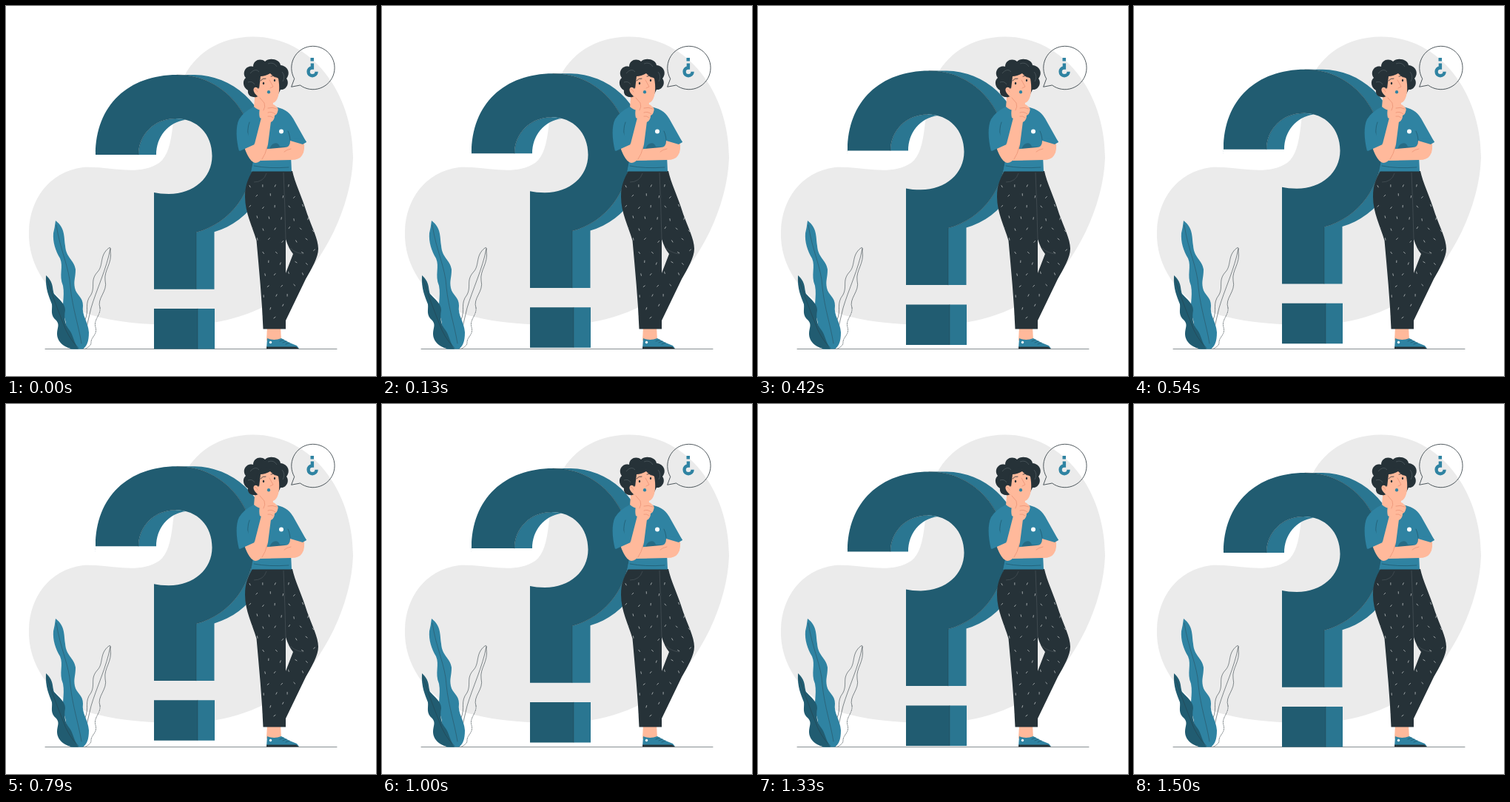
Recreate the animation shown at these times as an HTML page. Size 500 by 500 pixels, loop 1.54 s.

```html
<!DOCTYPE html>
<html lang="en">
<head>
<meta charset="utf-8">
<title>Thinking</title>
<style>
  html, body { margin: 0; width: 100%; height: 100%; overflow: hidden; background: #fff; }
  svg { display: block; width: 100%; height: 100%; }
  .blue { fill: #2f83a2; }
  .side { fill: #2a7691; }
  .deep { fill: #215c71; }
  .dark { fill: #263238; }
  .skin { fill: #ffb99b; }
  .line { fill: none; stroke: #263238; stroke-width: .8; stroke-linecap: round; stroke-linejoin: round; }
  .thin { stroke-width: .55; }
  .fold { fill: none; stroke: #215c71; stroke-width: .8; stroke-linecap: round; }
  .crease { fill: none; stroke: #e88f72; stroke-width: .7; stroke-linecap: round; }
</style>
</head>
<body>
<svg viewBox="0 0 500 500">
  <path fill="#ebebeb" d="M31 304C32 262 58 224 104 218C140 216 178 231 207 212C231 194 221 139 238 101C254 64 289 42 333 41.500C412 41 469 116 469 205C467 270 430 346 383 386C344 414 294 431 240 431C190 431 139 428 100 412C60 393 29 352 31 304Z"/>
  <path class="line thin" d="M53 463.500H447"/>

  <g id="plant">
    <path class="line thin" d="M107 424C113 410 105 403 115 390C121 378 113 371 124 359C132 350 126 337 139 327Q142 325 141 331C144 348 132 357 134 371C138 386 122 395 127 408M141 328C136 355 122 384 115 408Q107 436 105 462"/>
    <path class="line thin" stroke-dasharray="1.500 1.200" d="M127 408C128 418 118 424 121 434C124 445 114 447 115 456Q113 461 107 463"/>
    <path class="blue" d="M67 290C80 300 78 311 80 324C81 340 92 343 94 356C94 368 91 371 93 381C95 391 104 393 104 405C102 418 111 426 112 441C112 454 109 460 104 463.500H87C79 447 84 435 79 421C74 406 80 394 77 378C71 364 78 352 73 341C67 331 63 319 64 307Q66 299 67 290Z"/>
    <path class="deep" d="M54 364C65 374 62 381 65 389C72 397 80 402 80 411C78 422 80 431 85 437C91 444 91 454 98 463.500H91C78 462 69 453 69 443C69 435 73 431 68 425C59 418 63 410 62 403C58 392 53 383 54 364Z"/>
    <path class="line thin" d="M68 296C73 330 86 354 87 380C90 409 98 431 102 456M55 368Q66 401 77 428Q84 449 98 462" opacity=".65"/>
  </g>

  <g id="mark">
    <path class="side" d="M231 93.400H255A104 108 0 0 1 281.500 305.500V383H257V306C304 294 335 250 335 201C335 142 290 93.400 231 93.400Z"/>
    <path class="deep" d="M121 201.400C121 134 166 93.400 231 93.400C290 93.400 335 142 335 201C335 250 304 294 257 306V383H200V252.400Q208 254.300 220 254.300C254 254.300 278.500 232 278.500 203C278.500 174 259 152.400 229 152.400C201 152.400 179 174 179 201.400Z"/>
    <path class="side" d="M179 201.400C179 174 201 152.400 229 152.400Q237 152.400 243 154C219 157 203 177 203 201.400Z"/>
    <path class="deep" d="M200 409.400H259V463.900H200Z"/>
    <path class="side" d="M259 409.400H282V463.900H259Z"/>
    <path class="line thin" opacity=".55" d="M231 93.400C290 93.400 335 142 335 201C335 250 304 294 257 306V383M259 409.400V463.500M179 201.400C179 174 201 152.400 229 152.400"/>
  </g>

  <g id="bubble">
    <path class="line" d="M389.500 98A29.200 29.200 0 1 1 397.500 107L386 109.200Z"/>
    <path class="blue" d="M411.500 70H416V74.500H411.500Z"/>
    <path fill="none" stroke="#2f83a2" stroke-width="4.400" d="M413.900 77.500V83.500C410.500 83.500 408.600 86 408.600 88.700C408.600 92 411 94.200 414 94.200C417 94.200 419.600 92 419.600 88.800"/>
  </g>

  <g id="legs">
    <path class="skin" d="M353 433H371L372 452H352Z"/>
    <path class="blue" d="M353 449Q362 453 372 449Q382 455 393 459L396 462.800H352Z"/>
    <path class="dark" d="M352 460.500H392L396 463.300H352Z"/>
    <path class="fold" d="M370 453L375 451M374 455L379 453M378 457L383 455"/>
    <circle cx="357.500" cy="454.500" r="1.700" fill="#fff"/>
    <path class="dark" id="pants" fill-rule="evenodd" d="M333 223H387C390 238 400 258 407 281C413 298 422 315 422 328C422 340 413 355 405 369L378 425V436.500H347.500C346 397 342 357 338.500 317C333 298 323 279 323 258C323 242 327 234 333 223ZM378 315V361L388 335Q382 328 378 315Z"/>
    <clipPath id="cloth"><use href="#pants" clip-rule="evenodd"/></clipPath>
    <path id="flecks" clip-path="url(#cloth)" fill="none" stroke="#d5d8d9" stroke-width=".7" stroke-linecap="round"/>
    <path fill="none" stroke="#49545a" stroke-width=".7" d="M375 225Q377 270 378 315M384 327Q391 334 402 335M335 238Q348 238 352 226"/>
  </g>

  <g id="torso">
    <path class="skin" d="M337 112L360 123L362 143Q346 153 335 137Z"/>
    <path class="blue" d="M335 136Q345 146 362 136C374 138 382 142 388 152L406 184L400 187L384 182L386 223.500H331L334 209L327 186L315 196C311 181 310 163 315 153Q321 143 335 136Z"/>
    <path class="fold" d="M328 184Q325 166 329 157M384 189Q385 177 381 169M335 216Q355 220 382 218M334 205L331 222M361 138Q363 143 358 147"/>
    <path class="deep" d="M357 191C360 184 368 183 370 190L381 191L371 194H356Z" opacity=".6"/>
    <circle cx="372" cy="169.500" r="3" fill="#fff"/>
    <path class="skin" d="M384 182L402 181Q405 195 400 202Q396 208 386 208L344 209L344 194L377 191Q384 191 384 182Z"/>
    <path class="blue" d="M383 181L401 178L406 183.500L401 187L384 182Z"/>
    <path class="skin" d="M322 191L336 186L345 151L358 156L354 187C351 201 345 212 337 212Q329 211 322 191Z"/>
    <path class="blue" d="M314 157Q324 160 330 182L336 187L316 196Q310 174 314 157Z"/>
    <path class="crease" d="M353 190Q351 200 346 207M385 193Q379 194 376 197"/>
  </g>

  <g id="head">
    <path class="dark" d="M339 123C332 124 326 121 327 114C320 110 319 101 324 97C318 90 325 79 334 82C334 73 344 70 350 75C356 69 370 72 371 80C381 81 385 91 379 98C384 105 378 114 371 113L366 123Z"/>
    <path class="skin" d="M342 96C346 89 355 91 358 88Q364 94 368 98C370 109 370 121 365 128C360 134 350 132 344 126L338 120Q333 115 335 111Q338 108 341 112Z"/>
    <path class="dark" d="M338 104Q337 91 347 86Q362 82 370 98Q361 96 357 91Q350 95 344 95L342 112Z"/>
    <path class="line" d="M344 101Q347 97 351 98M358 95Q361 93 364 96"/>
    <ellipse class="dark" cx="348" cy="104.500" rx="1.200" ry="1.800"/>
    <ellipse class="dark" cx="363" cy="100.500" rx="1.100" ry="1.700"/>
    <path class="crease" d="M356 100L361 109L357 111M336 112Q339 113 340 116"/>
    <ellipse cx="355" cy="116.300" rx="2.100" ry="2.200" fill="#2f83a2"/>
    <path fill="none" stroke="#59656b" stroke-width=".6" d="M330 91Q337 83 342 89M354 78Q362 75 366 82M373 89Q378 95 374 102M327 103Q333 101 336 106"/>
  </g>

  <g id="hand">
    <path class="skin" d="M343 151C341 143 344 138 343 132L338 125Q338 121 342 123L349 131L357 133Q362 132 365 136Q369 138 367 143Q366 147 363 148C363 154 359 158 355 157Z"/>
    <path class="crease" d="M343 124L349 131Q351 136 348 141M354 138Q360 136 366 139M354 144Q359 142 364 146M354 149Q358 148 361 151"/>
  </g>
</svg>
<script>
  const LOOP = 1540, PEAK = 725, HEIGHT = 10, MS_PER_PX = 75;
  const mark = document.getElementById("mark");

  let seed = 7;
  const random = () => (seed = seed * 16807 % 2147483647) / 2147483647;

  // Scatter short strokes over a jittered, staggered grid.
  let flecks = "";
  for (let row = 0; row < 13; row++) {
    for (let col = 0; col < 6; col++) {
      const x = 329 + col * 17 + (row % 2) * 8 + random() * 4;
      const y = 238 + row * 15 + random() * 5;
      const angle = 0.5 + random() * 2;
      flecks += `M${x} ${y}l${2.6 * Math.cos(angle)} ${2.6 * Math.sin(angle)}`;
    }
  }
  document.getElementById("flecks").setAttribute("d", flecks);

  function draw() {
    const t = performance.now() % LOOP;
    const lift = Math.abs(HEIGHT - Math.abs(t - PEAK) / MS_PER_PX);
    mark.setAttribute("transform", `translate(0 ${-lift})`);
    requestAnimationFrame(draw);
  }
  draw();
</script>
</body>
</html>
```
